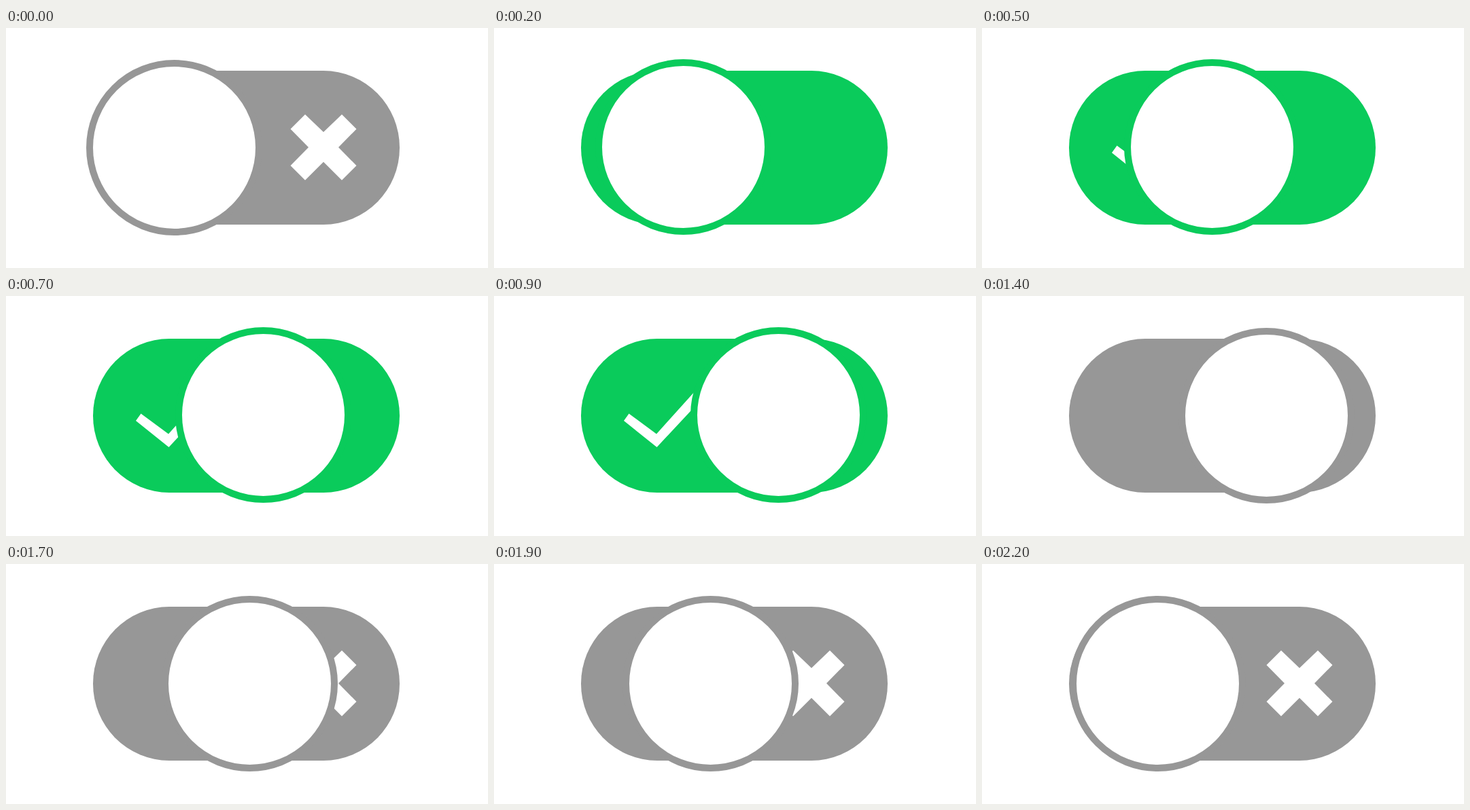
An HTML page for the animation above (2300 ms loop, 709x354 px).

```html
<!DOCTYPE html>
<html lang="en">
<head>
<meta charset="utf-8">
<title>Toggle switch</title>
<style>
  html, body { margin: 0; width: 100%; height: 100%; overflow: hidden; background: #fff; }
  svg { display: block; width: 709px; height: 354px; }
</style>
</head>
<body>
<svg viewBox="0 0 709 354">
  <rect id="track" x="128" y="63" width="451" height="227" rx="112" ry="113.5"/>
  <path id="cross" fill="#fff" d="M440 127.5 467 153.5 494 127.5 515.5 149 489 176 515.5 203 494 224.5 467 197.5 440 224.5 418.5 203 445 176 418.5 149Z"/>
  <path id="check" fill="#fff" d="M198.5 173.5 239 203.5 305 130 314 143 239.5 223 191 184Z"/>
  <circle id="knob" r="124.5" fill="#fff" stroke-width="10"/>
</svg>
<script>
  const LOOP = 2300, STEP = 100, TRAVEL = 20;
  const ON_AT = 200, ON_REST = 1100, OFF_AT = 1300;
  const GREEN = '#0acb5b', GREY = '#979797';
  const [track, cross, check, knob] =
    ['track', 'cross', 'check', 'knob'].map(id => document.getElementById(id));

  // The knob advances in whole steps and rests at either end.
  function knobX(t) {
    if (t < ON_AT) return 247.5;
    if (t < ON_REST) return 278.5 + TRAVEL * Math.floor((t - ON_AT) / STEP);
    if (t < OFF_AT) return 458.5;
    return 438.5 - TRAVEL * Math.floor((t - OFF_AT) / STEP);
  }

  function draw(t) {
    const on = t >= ON_AT && t < OFF_AT;
    const color = on ? GREEN : GREY;
    track.setAttribute('fill', color);
    knob.setAttribute('stroke', color);
    knob.setAttribute('cx', knobX(t));
    knob.setAttribute('cy', on ? 175.5 : 176.5);
    cross.style.display = on ? 'none' : '';
    check.style.display = on && t < ON_REST ? '' : 'none';
  }

  const start = performance.now();
  function tick() {
    draw((performance.now() - start) % LOOP);
    requestAnimationFrame(tick);
  }
  tick();
</script>
</body>
</html>
```
